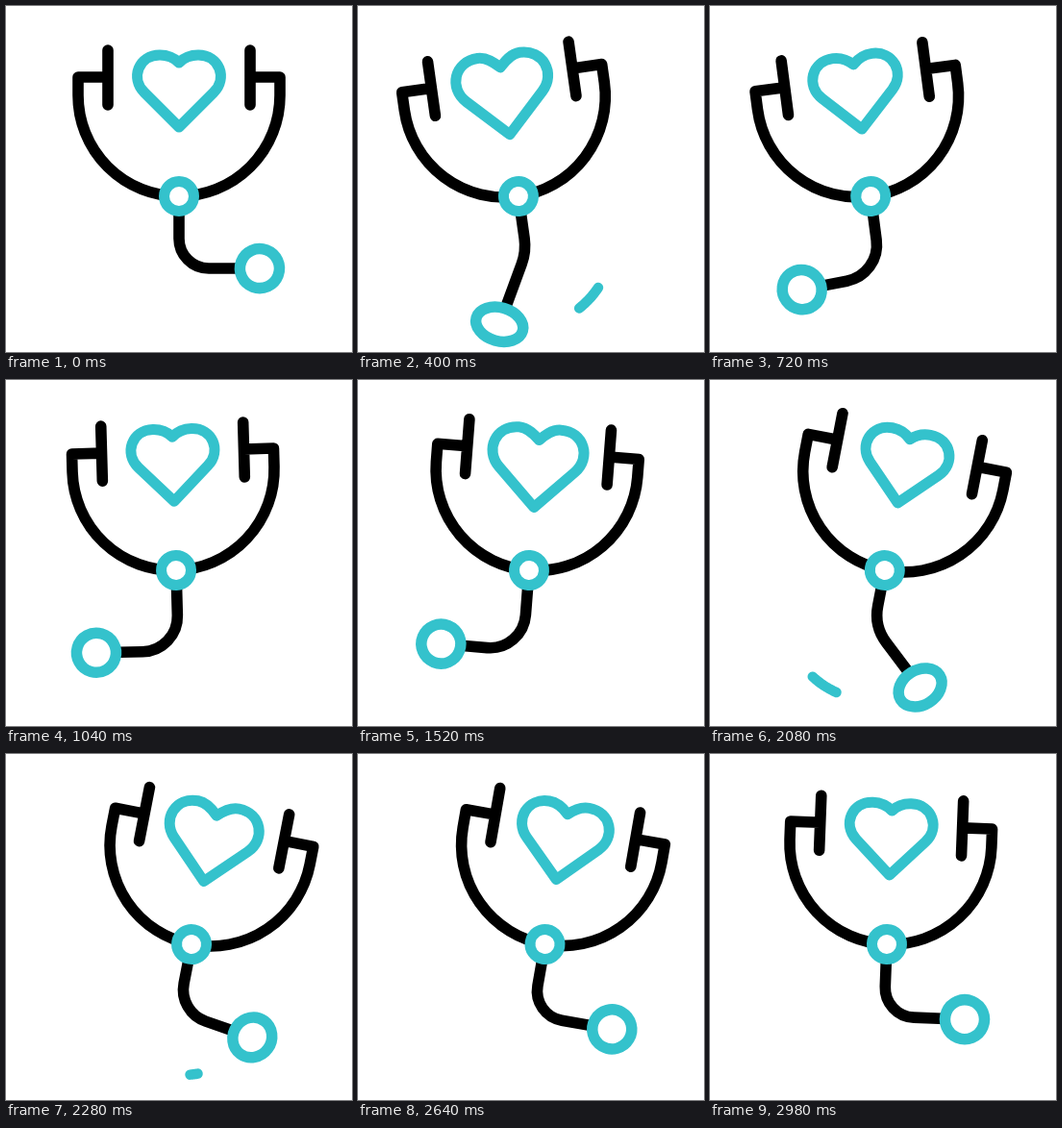
An HTML page with a canvas that plays this animation: 360 px wide and 360 px high, repeating every 3 s.

```html
<!DOCTYPE html>
<html>
<head>
<meta charset="utf-8">
<style>
html, body { margin: 0; width: 100%; height: 100%; overflow: hidden; background: #fff; }
canvas { display: block; }
</style>
</head>
<body>
<canvas id="stage" width="360" height="360"></canvas>
<script>
const ctx = document.getElementById('stage').getContext('2d');
const LOOP = 3, SWING = 0.86, BACK = 1.62;
const TEAL = '#34c2cc', BLACK = '#000', LINE = 11.6;
const { PI, sin, cos, min, max, atan2 } = Math;
const mix = (a, b, k) => a + (b - a) * k;
const rad = deg => deg * PI / 180;

// Body sway: [seconds, hub x, tilt in degrees]
const sway = [
  [0.02, 182.3, 1.3], [0.4, 167, -8], [0.55, 163.6, -9.1], [0.8, 169.5, -6.3],
  [1.04, 177, -1.65], [1.25, 180, 0.9], [1.52, 178, 4.4], [1.84, 175, 10.5],
  [2.16, 185, 10.9], [2.28, 193, 11], [2.45, 196, 12.2], [2.72, 193, 8.5], [2.98, 184, 2.2]
];

function swayKey(i) {
  const n = sway.length, turn = Math.floor(i / n);
  const [t, x, tilt] = sway[i - turn * n];
  return [t + turn * LOOP, x, tilt];
}

// Periodic cubic through the sway keys
function swayAt(t) {
  let i = -1;
  while (swayKey(i + 1)[0] <= t) i++;
  const [a, b, c, d] = [-1, 0, 1, 2].map(k => swayKey(i + k));
  const span = c[0] - b[0], u = (t - b[0]) / span;
  return [1, 2].map(k => {
    const m0 = (c[k] - a[k]) / (c[0] - a[0]) * span;
    const m1 = (d[k] - b[k]) / (d[0] - b[0]) * span;
    return b[k] * (1 + 2 * u) * (1 - u) ** 2 + m0 * u * (1 - u) ** 2
      + c[k] * u * u * (3 - 2 * u) + m1 * u * u * (u - 1);
  });
}

// Cubic bezier easing (.33, 0, .3, 1)
function ease(x) {
  if (x >= 1) return 1;
  let lo = 0, hi = 1;
  for (let i = 0; i < 24; i++) {
    const u = (lo + hi) / 2, v = 1 - u;
    if (0.99 * u * v * v + 0.9 * u * u * v + u ** 3 < x) lo = u; else hi = u;
  }
  return lo * lo * (3 - 2 * lo);
}

// Chest piece path: q = 0 at the right, 1 at the left
function chestAt(q, outset = 0) {
  const a = rad(mix(48.2, -45.7, q));
  const r = mix(112.6, 119.4, q) + 21 * sin(PI * q) + outset;
  return [r * sin(a), r * cos(a)];
}

function stroke(color, width, draw) {
  ctx.beginPath();
  draw();
  ctx.strokeStyle = color;
  ctx.lineWidth = width;
  ctx.stroke();
}

function ring(x, y, rx, ry, tilt, width) {
  ctx.fillStyle = '#fff';
  stroke(TEAL, width, () => {
    ctx.ellipse(x, y, rx, ry, tilt, 0, 2 * PI);
    ctx.fill();
  });
}

// The beat swells the heart and deepens its notch; the line keeps its weight
function heart(beat) {
  const scale = 1 + 0.11 * beat, notch = -2 + 3.5 * beat;
  ctx.save();
  ctx.translate(0, -137);
  ctx.scale(scale, scale);
  stroke(TEAL, 11 / scale, () => {
    ctx.moveTo(0, 65);
    ctx.lineTo(-36, 29);
    ctx.bezierCurveTo(-51, 14, -42, -10, -20, -10);
    ctx.bezierCurveTo(-11, -10, -4, notch - 4, 0, notch);
    ctx.bezierCurveTo(4, notch - 4, 11, -10, 20, -10);
    ctx.bezierCurveTo(42, -10, 51, 14, 36, 29);
    ctx.closePath();
  });
  ctx.restore();
}

function yoke() {
  stroke(BLACK, LINE, () => {
    ctx.moveTo(-74, -124);
    ctx.lineTo(-105, -124);
    ctx.arc(0, -105, 105, PI, 0, true);
    ctx.lineTo(105, -124);
    ctx.lineTo(74, -124);
    for (const x of [-74, 74]) {
      ctx.moveTo(x, -152);
      ctx.lineTo(x, -95);
    }
  });
}

function streak(s, side) {
  const k = s - 0.22;
  const lead = 0.06 + 1.3 * k;
  const tail = max(-0.02, 0.56 * k + 1.8 * k * k);
  if (lead <= max(tail, 0)) return;
  stroke(TEAL, 10.5, () => {
    for (let i = 0; i <= 8; i++) {
      const q = side(mix(tail, lead, i / 8));
      ctx.lineTo(...chestAt(q, 3 * cos(PI * q) ** 2));
    }
  });
}

function draw(t) {
  const rest = t < 0.02;
  const [x, tilt] = rest ? [180, 0] : swayAt(t);
  const s = rest ? 0 : t < BACK ? t : t - BACK;
  const side = t < BACK ? p => p : p => 1 - p;
  const q = side(ease(s / SWING));
  const stretch = sin(PI * q);
  const [cx, cy] = chestAt(q);
  const [ax, ay] = chestAt(q + 0.01), [bx, by] = chestAt(q - 0.01);
  const beat = sin(PI * min(t % 1 / 0.85, 1)) ** 2;

  ctx.fillStyle = '#fff';
  ctx.fillRect(0, 0, 360, 360);
  ctx.lineCap = ctx.lineJoin = 'round';
  ctx.save();
  ctx.translate(x, 198);
  ctx.rotate(rad(tilt));

  heart(beat);
  yoke();
  stroke(BLACK, LINE, () => {
    ctx.moveTo(0, 0);
    ctx.arcTo(0, mix(75, 84, q) - 28 * stretch, cx, cy, 31 + 6 * q + 25 * stretch);
    ctx.lineTo(cx, cy);
  });
  streak(s, side);
  ring(0, 0, 15.5, 15.5, 0, 11);
  ring(cx, cy, 20.5 + 5.5 * stretch, 20.5 - 3.7 * stretch, atan2(ay - by, ax - bx), 11.5);
  ctx.restore();
}

function tick() {
  draw(performance.now() / 1000 % LOOP);
  requestAnimationFrame(tick);
}
tick();
</script>
</body>
</html>
```
